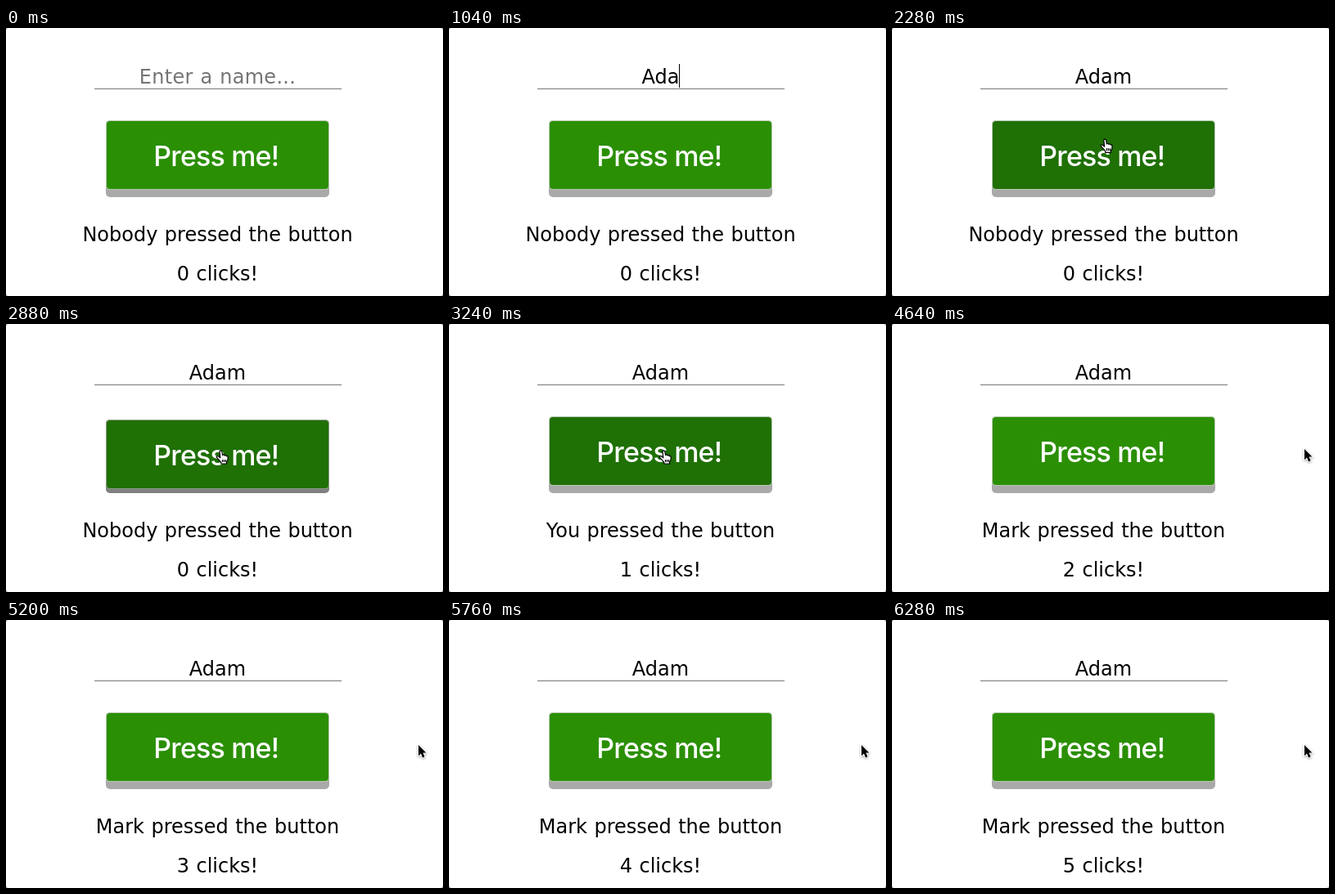
Recreate the animation shown at these times as an HTML page with a canvas. Size 534 by 328 pixels, loop 6.36 s.

```html
<!DOCTYPE html>
<html lang="en">
<head>
<meta charset="utf-8">
<style>
html, body { margin: 0; width: 100%; height: 100%; overflow: hidden; background: #fff; }
canvas { display: block; }
</style>
</head>
<body>
<canvas id="stage" width="534" height="328"></canvas>
<script>
const ctx = document.getElementById('stage').getContext('2d');
const LOOP = 6360, MID = 258.5;
const BODY = '24px Verdana, "DejaVu Sans", sans-serif';

// Each list holds [start time, value]; the last one reached applies.
const NAMES = [[0, ''], [840, 'A'], [920, 'Ad'], [1040, 'Ada'], [1440, 'Adam']];
const CARET = [[0, false], [400, true], [1960, false], [2440, true], [2720, false]];
const CLICKS = [[0, 0], [2960, 1], [4360, 2], [4920, 3], [5520, 4], [6000, 5]];
const WHO = [[0, 'Nobody'], [2960, 'You'], [4360, 'Mark']];
const PRESSES = [[2760, 3080], [4360, 4520], [4920, 5080], [5520, 5680], [6000, 6160]];

// Pointer tip: [time, x, y]
const PATH = [[1880, 250, 60], [2440, 261, 155], [3360, 261, 155], [3640, 507, 150],
  [3800, 507, 150], [3960, 504, 153], [LOOP, 504, 153]];

const HAND = new Path2D('M0 1C0 -.6 2.6 -.6 2.8 1L3.5 5.5C4 4.6 5.8 4.8 6 6C6.7 5.2 8.2 5.6 8.3 6.8' +
  'C9.2 6.2 10.3 6.8 10.2 8.2L9.9 11.5L8.6 14V16H1.8V14.3L-1.4 10.6L-3.6 8.2' +
  'C-4.2 7 -2.8 6 -1.6 6.9L.8 8.8Z');
const ARROW = new Path2D('M0 0V13.2L3 10.5L5.1 15.4L7.6 14.3L5.5 9.5H9.5Z');
const BEAM = new Path2D('M-3 -8Q0 -8 0 -6Q0 -8 3 -8M0 -6V6M-3 8Q0 8 0 6Q0 8 3 8');

const at = (list, t) => list.filter(([start]) => start <= t).pop()[1];
const ease = k => k * k * (3 - 2 * k);

function box(x, y, w, h, r, color) {
  ctx.fillStyle = color;
  ctx.beginPath();
  ctx.roundRect(x, y, w, h, r);
  ctx.fill();
}

function label(text, y, color = '#000', spacing = 0) {
  ctx.font = BODY;
  ctx.textAlign = 'center';
  ctx.letterSpacing = spacing + 'px';
  ctx.wordSpacing = '0.8px';
  ctx.fillStyle = color;
  ctx.fillText(text, MID, y);
}

function pointerAt(t) {
  if (t < PATH[0][0]) return null;
  const i = PATH.findIndex(p => p[0] > t);
  const [t0, x0, y0] = PATH[i - 1], [t1, x1, y1] = PATH[i];
  const k = ease((t - t0) / (t1 - t0));
  return { x: x0 + (x1 - x0) * k, y: y0 + (y1 - y0) * k };
}

function drawInput(t) {
  const name = at(NAMES, t);
  ctx.fillStyle = '#777';
  ctx.fillRect(108, 74, 302, 1);
  if (name) label(name, 68);
  else label('Enter a name...', 68, '#757575', 0.3);
  if (at(CARET, t)) {
    const end = MID + ctx.measureText(name).width / 2;
    ctx.fillStyle = '#000';
    ctx.fillRect(Math.round(end), 44, 1, 29);
  }
}

function drawButton(pressed, hover) {
  const dy = pressed ? 4 : 0;
  box(122, 117, 273, 90, 5, pressed ? '#808080' : '#a9a9a9');
  box(122, 113 + dy, 273, 85, 4.5, pressed ? '#8a9a84' : '#b5c9ae');
  box(123, 114 + dy, 271, 83, 4, pressed || hover ? '#1f7005' : '#2b8f04');
  ctx.font = '500 34px Inter, Roboto, sans-serif';
  ctx.textAlign = 'left';
  ctx.letterSpacing = '-0.85px';
  ctx.wordSpacing = '0px';
  ctx.fillStyle = '#fff';
  ctx.fillText('Press me!', 180.3, 169 + dy);
}

function drawPointer({ x, y }, hover) {
  ctx.save();
  ctx.translate(x, y);
  ctx.lineJoin = 'round';
  if (hover) {
    ctx.fillStyle = '#fff';
    ctx.strokeStyle = '#000';
    ctx.lineWidth = 1.2;
    ctx.fill(HAND);
    ctx.stroke(HAND);
    ctx.stroke(new Path2D('M3.5 11V14M5.5 11V14M7.5 11V14'));
  } else if (y < 76) {
    ctx.strokeStyle = '#000';
    ctx.lineWidth = 1;
    ctx.stroke(BEAM);
  } else {
    ctx.shadowColor = 'rgba(0,0,0,.35)';
    ctx.shadowBlur = 3;
    ctx.shadowOffsetY = 1;
    ctx.strokeStyle = '#fff';
    ctx.lineWidth = 2;
    ctx.stroke(ARROW);
    ctx.shadowColor = 'transparent';
    ctx.fillStyle = '#000';
    ctx.fill(ARROW);
  }
  ctx.restore();
}

function draw(t) {
  const pointer = pointerAt(t);
  const hover = !!pointer && pointer.x < 395 && pointer.y > 113;
  const pressed = PRESSES.some(([from, to]) => t >= from && t < to);
  ctx.fillStyle = '#888';
  ctx.fillRect(0, 0, 534, 328);
  box(0, 0, 534, 328, 3, '#fff');
  drawInput(t);
  drawButton(pressed, hover);
  label(at(WHO, t) + ' pressed the button', 261);
  label(at(CLICKS, t) + ' clicks!', 309);
  if (pointer) drawPointer(pointer, hover);
}

const begin = performance.now();
function tick() {
  draw((performance.now() - begin) % LOOP);
  requestAnimationFrame(tick);
}
tick();
</script>
</body>
</html>
```
